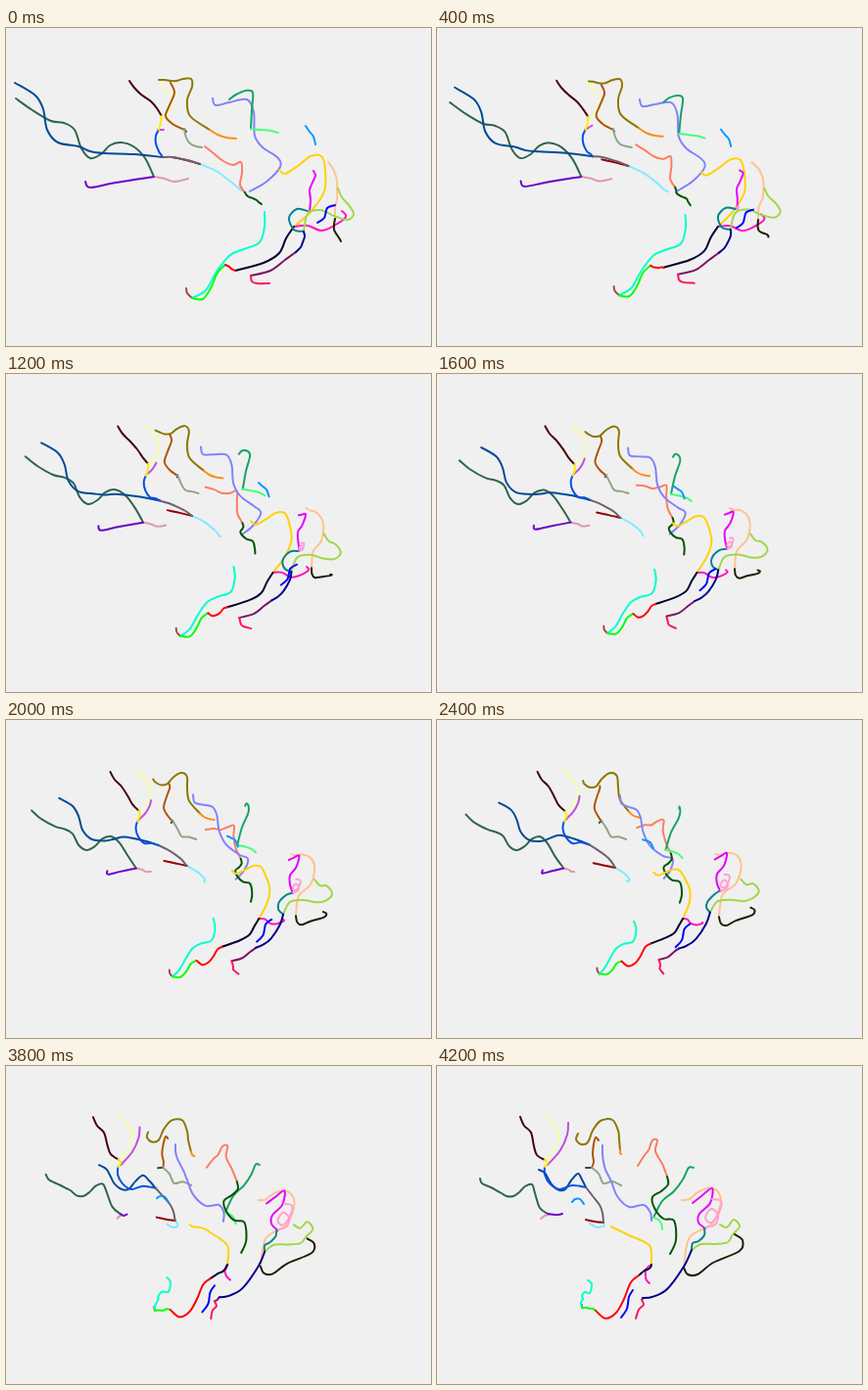
An HTML page with a canvas that plays this animation: 434 px wide and 325 px high, repeating every 4600 ms.

```html
<!DOCTYPE html>
<html>
<head>
<meta charset="utf-8">
<title>Morphing curves</title>
<style>
  html, body { margin: 0; width: 100%; height: 100%; overflow: hidden; background: #f0f0f0; }
  canvas { display: block; }
</style>
</head>
<body>
<canvas id="stage" width="434" height="325"></canvas>
<script>
const ctx = document.getElementById('stage').getContext('2d');
const LOOP = 4600, STEP = 200, LAST_STEP = 21;
const curves = [];

const parse = text => text.split(' ').map(pair => pair.split(',').map(Number));

// A curve drifts linearly from its start knots to its end knots.
function curve(color, start, end) {
  curves.push({ color, start: parse(start), end: parse(end) });
}

// Left: long strands and their branches
curve('#2f6649',
  '10,72 27,84 46,95 59,97 70,104 77,123 86,133 97,129 106,120 117,117 130,121 142,133 151,152',
  '44,115 46,120 55,124 62,128 66,130 71,133 78,133 84,129 90,123 97,121 100,130 105,145 113,151');
curve('#004b96',
  '9,56 30,69 38,83 42,104 53,117 74,121 86,126 100,128 130,129 160,132',
  '104,106 110,109 114,116 118,122 125,127 131,126 137,117 144,110 148,116 152,124');
curve('#dc9baa', '151,152 162,154 172,157 186,154', '113,151 114,152 110,153 106,156');
curve('#6e00c8', '81,157 86,163 112,158 151,152', '128,151 124,152 120,152 113,151');
curve('#0050e6',
  '156,104 153,110 153,118 156,126 158,129 160,132',
  '110,103 110,111 115,120 125,126 138,122 152,124');
curve('#80ebff',
  '198,139 216,147 233,160 239,165 244,168',
  '170,160 171,163 169,164 163,165 156,161');
curve('#960000', '170,132 184,135 198,139', '152,157 161,159 170,160');
curve('#706070',
  '160,132 170,132 180,134 189,136 198,139',
  '152,124 159,133 166,142 169,150 170,160');

// Upper left
curve('#f5ffaa',
  '156,53 162,62 170,72 168,83 160,91',
  '110,50 120,59 124,72 119,88 110,98');
curve('#46000f',
  '126,54 131,61 138,68 148,75 154,82 159,90',
  '85,52 89,61 96,68 99,82 102,91 110,96');
curve('#be50dc', '161,104 159,104 157,104 155,104', '134,58 133,70 126,86 113,101');
curve('#ffeb00', '159,90 158,97 156,104', '110,96 113,99 110,103');
curve('#8c7800',
  '156,53 162,53 168,54 174,54 181,52 189,52 190,60 185,74 188,90 208,104',
  '144,69 142,75 147,80 154,78 159,66 167,56 179,55 185,66 186,75 187,86');
curve('#ff8c14', '208,104 216,109 225,112 235,113', '187,86 187,88 187,89 188,90');
curve('#af5500',
  '168,56 172,66 167,79 163,90 170,98 182,104',
  '165,76 162,73 160,80 159,90 160,98 158,104');
curve('#1e5064', '184,106 182,103', '152,104 158,104');
curve('#91a582',
  '182,103 184,112 188,118 194,121 200,122',
  '158,104 165,110 170,120 179,118 188,122');

// Centre
curve('#ff7d5f',
  '203,121 213,129 222,136 232,140 240,137 241,148 239,160 244,168',
  '205,102 212,91 216,86 220,76 225,76 223,87 230,100 235,113');
curve('#8282ff',
  '211,72 214,79 228,76 246,73 253,86 254,110 262,122 277,132 280,142 266,157 249,167',
  '169,81 169,90 170,98 172,106 174,110 178,118 184,133 196,144 211,142 218,150 219,158');
curve('#14a564',
  '228,73 235,68 245,64 252,66 251,84 250,103',
  '262,104 257,104 251,116 242,128 230,138 221,155');
curve('#46ff7d', '250,103 259,104 270,105 278,107', '221,155 226,157 229,161 230,167');
curve('#005500',
  '244,168 245,170 246,171 247,172 249,173 252,174 256,176 258,178 261,180',
  '235,113 236,121 229,128 220,134 222,145 231,156 242,158 244,178 238,192');
curve('#0a96ff', '306,100 310,106 314,111 316,119', '138,139 141,136 146,136 150,141');

// Lower centre
curve('#ffd200',
  '279,145 285,149 298,141 311,131 322,131 326,145 325,167 311,188 294,203',
  '178,164 181,166 184,167 188,169 192,171 198,174 208,178 218,185 219,203');
curve('#ff14be',
  '294,203 308,202 322,207 335,202 347,193 343,187',
  '219,203 216,205 213,209 213,215 214,219 217,222');
curve('#000032',
  '294,203 286,215 279,230 263,240 234,248',
  '219,203 218,206 215,208 212,209 206,214');
curve('#aa4646', '184,266 185,271 190,276', '148,244 148,246 148,247');
curve('#00ffcd',
  '264,188 264,203 259,219 243,226 229,232 215,249 204,268 190,276',
  '154,219 158,223 156,232 151,231 148,235 149,238 147,242 148,247');
curve('#00ff00',
  '224,242 216,250 209,266 201,277 190,276',
  '162,250 159,248 156,248 153,247 148,247');
curve('#ff0000',
  '234,248 232,247 230,246 228,244 226,243 224,242',
  '206,214 198,221 191,238 183,252 172,258 162,250');

// Right
curve('#ffc38c',
  '329,137 332,141 335,146 338,156 338,164 338,175 336,184 336,195',
  '250,137 258,136 268,128 282,125 290,137 281,161 258,175 252,206');
curve('#e600fa',
  '314,146 315,148 316,151 312,160 310,166 311,176 310,187',
  '261,140 270,133 281,125 279,140 268,151 267,160 274,166');
curve('#ffa0d2',
  '310,187 310,187 310,187 310,187 310,187 310,187 310,187 310,187 310,187',
  '274,165 284,162 287,152 280,146 274,155 280,160 288,150 290,138 281,136');
curve('#a0d74b',
  '339,164 343,173 350,181 355,190 349,196 335,192 321,186 308,190 304,208',
  '289,162 296,165 303,157 309,164 302,172 297,180 284,182 270,182 260,188');
curve('#00828c', '308,187 297,185 289,194 294,206 304,208', '273,166 273,173 267,179 261,181 260,188');
curve('#1e1e00',
  '336,195 335,201 335,206 337,210 339,213 341,216 342,218',
  '252,206 256,213 266,213 282,201 309,189 312,178 304,172');
curve('#0000ff', '336,181 328,184 325,194 318,199', '200,229 196,236 194,248 188,257');
curve('#7d1464', '296,229 285,237 270,248 250,253', '210,237 210,237 210,238 209,239');
curve('#00008c',
  '304,208 305,213 303,219 301,224 296,229',
  '260,188 252,205 235,228 220,236 210,237');
curve('#ff0f5f', '250,253 251,259 256,261 269,261', '209,239 211,244 206,249 203,258');

// Smooth Catmull-Rom stroke through the knots
function strokeThrough(points) {
  const at = i => points[Math.max(0, Math.min(points.length - 1, i))];
  ctx.beginPath();
  ctx.moveTo(...points[0]);
  for (let i = 0; i < points.length - 1; i++) {
    const [a, b, c, d] = [at(i - 1), at(i), at(i + 1), at(i + 2)];
    ctx.bezierCurveTo(
      b[0] + (c[0] - a[0]) / 6, b[1] + (c[1] - a[1]) / 6,
      c[0] - (d[0] - b[0]) / 6, c[1] - (d[1] - b[1]) / 6,
      c[0], c[1]);
  }
  ctx.stroke();
}

function draw() {
  const step = Math.min(LAST_STEP, Math.floor(performance.now() % LOOP / STEP));
  const mix = step / LAST_STEP;
  ctx.fillStyle = '#f0f0f0';
  ctx.fillRect(0, 0, 434, 325);
  ctx.lineWidth = 2;
  ctx.lineCap = ctx.lineJoin = 'round';
  for (const { color, start, end } of curves) {
    ctx.strokeStyle = color;
    strokeThrough(start.map(([x, y], i) => [
      x + (end[i][0] - x) * mix,
      y + (end[i][1] - y) * mix
    ]));
  }
  requestAnimationFrame(draw);
}
draw();
</script>
</body>
</html>
```
